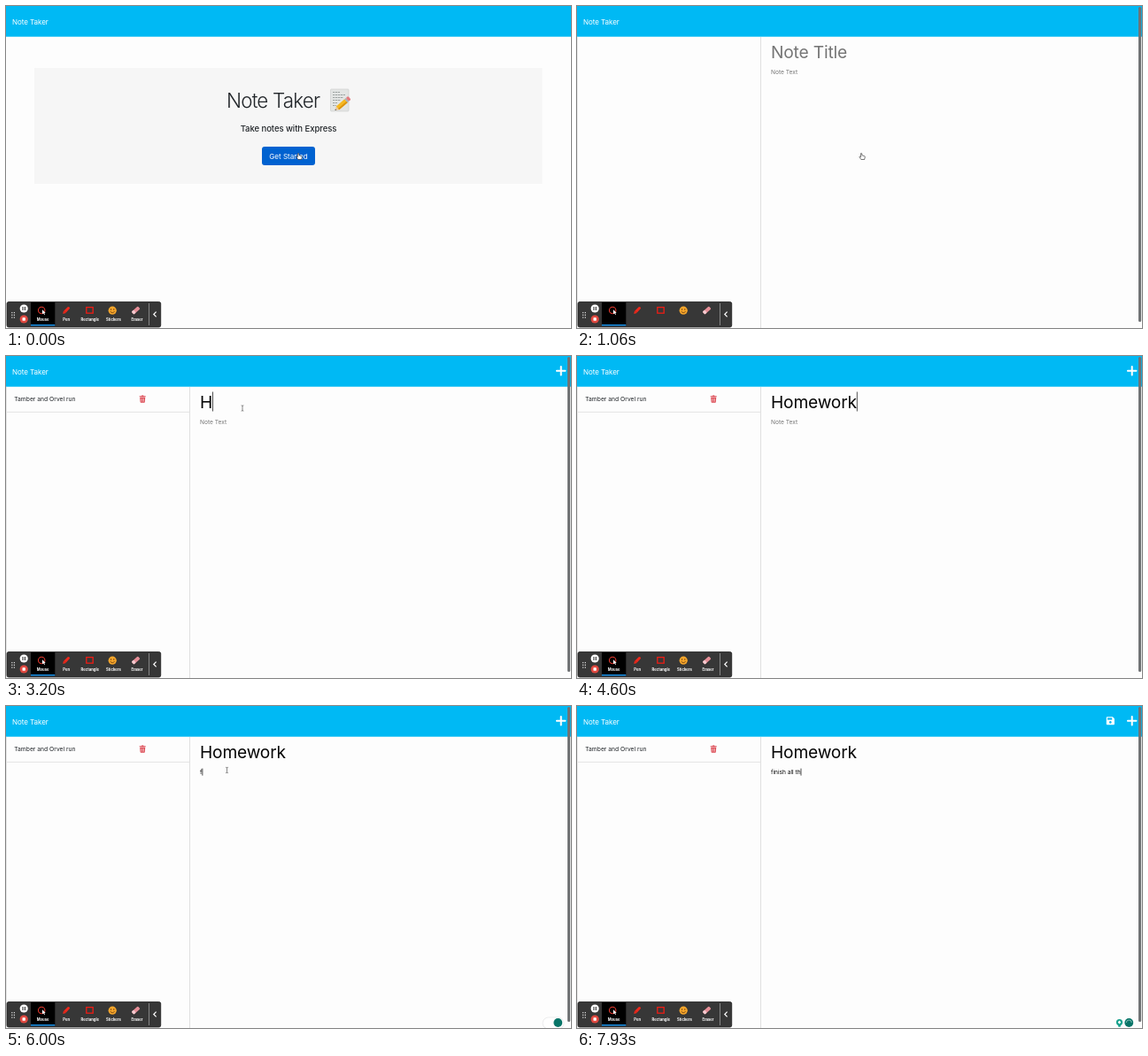
An HTML page that plays this animation: 638 by 364 pixels, repeating every 8000 ms.

```html
<!DOCTYPE html>
<html lang="en">
<head>
<meta charset="utf-8">
<title>Note Taker</title>
<style>
  html, body { margin: 0; width: 100%; height: 100%; overflow: hidden; background: #fdfdfd; }
  svg { display: block; width: 638px; height: 364px; font-family: Inter, "Open Sans", sans-serif; }
  text { white-space: pre; }
  .brand { font-size: 8px; letter-spacing: -.04px; fill: #fff; }
  #title { font-size: 19.2px; letter-spacing: -.18px; }
  #body { font-size: 6.6px; }
  #labels { font-size: 4.2px; font-weight: 700; fill: #fff; text-anchor: middle; }
</style>
</head>
<body>
<svg viewBox="0 0 638 364">
  <rect width="638" height="364" fill="#fdfdfd"/>

  <g id="home">
    <rect x="32" y="70" width="573.5" height="131" fill="#f6f6f6"/>
    <text x="249" y="115.3" font-size="22.4" font-weight="300" letter-spacing="-.8" fill="#212529">Note Taker</text>
    <g id="memo">
      <rect x="366.5" y="94" width="20.5" height="25" rx="1" fill="#e3e5e4" stroke="#c9cccb" stroke-width=".6"/>
      <path d="M369 97.5h8M369 100.5h14M369 103.5h12M369 106.5h9M369 109.5h5M369 112.5h4" stroke="#8d9392" stroke-width=".8" stroke-dasharray="2.4 .6"/>
      <g transform="translate(371.5 118) rotate(-41)">
        <path d="M0 0 4-2.6V2.6Z" fill="#e9c79a"/>
        <path d="M0 0 1.4-.9V.9Z" fill="#444"/>
        <rect x="4" y="-2.6" width="12.5" height="5.2" fill="#f6b821"/>
        <rect x="4" y=".8" width="12.5" height="1.8" fill="#dc9310"/>
        <rect x="16.5" y="-2.6" width="2" height="5.2" fill="#aab0b3"/>
        <rect x="18.5" y="-2.6" width="3.2" height="5.2" rx="1.3" fill="#e5797d"/>
      </g>
    </g>
    <text x="319" y="142" font-size="9.6" font-weight="500" letter-spacing="-.1" text-anchor="middle" fill="#212529">Take notes with Express</text>
    <rect x="289" y="159" width="60" height="21" rx="3" fill="#0062d0"/>
    <text x="319" y="172.5" font-size="8.1" text-anchor="middle" fill="#fff">Get Started</text>
  </g>

  <g id="notes">
    <path d="M207.5 35V364M.3 35V364" stroke="#d8d8d8" stroke-width=".8"/>
    <g class="loaded">
      <path d="M1 63.4H207" stroke="#dedede" stroke-width=".8"/>
      <text x="9.2" y="51.3" font-size="6.75" fill="#212529">Tamber and Orvel run</text>
      <g fill="#dc4650">
        <path d="M150.7 45.2h2.1l.5-.7h1.8l.5.7h2.1v1h-7z"/>
        <path d="M151.2 46.8h6l-.4 5.3q0 .6-.7.6h-3.8q-.7 0-.7-.6z"/>
        <path d="M152.8 47.8v3.9M154.2 47.8v3.9M155.6 47.8v3.9" stroke="#fff" stroke-width=".5"/>
      </g>
    </g>
    <text id="title" x="219" y="59.2"></text>
    <text id="body" x="219" y="77"></text>
    <path id="caret" stroke="#222" stroke-width=".8"/>
  </g>

  <rect width="638" height="34.7" fill="#00b9f4"/>
  <text class="brand" x="7" y="20.5">Note Taker</text>
  <path class="loaded" d="M626.7 12V21.6M621.9 16.8H631.5" stroke="#fff" stroke-width="2" stroke-linecap="round"/>
  <g id="save">
    <path d="M598.7 12.2h6.2l2 2v6.1q0 .9-.9.9h-7.3q-.9 0-.9-.9v-7.2q0-.9.9-.9z" fill="#fff"/>
    <rect x="599" y="13.4" width="5.2" height="2.2" fill="#00b9f4"/>
    <circle cx="602.3" cy="18.4" r="1.3" fill="#00b9f4"/>
  </g>
  <rect id="bar" x="634" y="1" width="3.2" height="356" rx="1.6" fill="#707375"/>

  <g id="helper">
    <rect id="pill" x="606" y="352" width="24" height="13" rx="6.5" fill="#fff" stroke="#e2e4e6" stroke-width=".7"/>
    <g id="tip">
      <circle cx="612.5" cy="357.6" r="3.6" fill="#15a08b"/>
      <rect x="611.1" y="360.8" width="2.8" height="2" rx=".7" fill="#15a08b"/>
      <path d="M612.5 355.6l1.8 2-1.8 2-1.8-2z" fill="#fff"/>
    </g>
    <circle cx="623.3" cy="358" r="4.9" fill="#087568"/>
    <path id="busy" d="M620.3 358a3 3 0 0 1 6 0" fill="none" stroke="#8fc4bc" stroke-width=".9"/>
  </g>

  <g id="toolbar">
    <rect x="1" y="334.5" width="173.7" height="28.5" rx="2" fill="#373737" stroke="#1d1d1d" stroke-width=".8"/>
    <rect x="28" y="335" width="27.3" height="26.5" fill="#000"/>
    <rect x="28" y="360" width="27.3" height="1.5" fill="#1590e8"/>
    <path d="M6.8 346V353M9.4 346V353" stroke="#ddd" stroke-width="1.2" stroke-dasharray="1.2 1.6"/>
    <circle cx="20.2" cy="342" r="4.6" fill="#fff"/>
    <path d="M19 340v4M21.4 340v4" stroke="#333" stroke-width="1.1"/>
    <circle cx="20.2" cy="354" r="4.6" fill="#e0483f"/>
    <rect x="18.5" y="352.3" width="3.4" height="3.4" rx=".4" fill="#fff"/>
    <circle cx="40.2" cy="344" r="3.7" fill="none" stroke="#e8392e" stroke-width="1.1"/>
    <path d="M41 343.2v5l1.3-1 .9 1.8.9-.5-.9-1.6h1.5z" fill="#fff"/>
    <g transform="translate(64.2 348) rotate(-46)" fill="#ee2a1d">
      <path d="M0 0 2.6-1.5H9q1.6 0 1.6 1.5T9 1.5H2.6Z"/>
      <path d="M3.2-1.5V1.5" stroke="#8d1712" stroke-width=".5"/>
    </g>
    <rect x="90.8" y="340.6" width="7.4" height="6.6" fill="none" stroke="#ee1d15" stroke-width="1.3"/>
    <circle cx="120.2" cy="344.2" r="4.6" fill="#f6a62b"/>
    <g fill="#68390d"><circle cx="118.6" cy="343" r=".7"/><circle cx="121.8" cy="343" r=".7"/></g>
    <path d="M117.7 345.5q2.5 2.6 5 0" fill="none" stroke="#68390d" stroke-width=".8"/>
    <g transform="translate(146.6 344) rotate(-42)">
      <rect x="-4.8" y="-2" width="9.6" height="4" rx="1" fill="#e78f98"/>
      <rect x="-4.8" y="-2" width="3.2" height="4" rx="1" fill="#f3cbd0"/>
    </g>
    <path d="M161.5 336V361" stroke="#aaa" stroke-width=".7"/>
    <path d="M169.6 345.6l-2.8 2.9 2.8 2.9" fill="none" stroke="#fff" stroke-width="1.2"/>
    <g id="labels">
      <text x="41.6" y="355.6">Mouse</text>
      <text x="68.2" y="355.6">Pen</text>
      <text x="94.8" y="355.6">Rectangle</text>
      <text x="121.4" y="355.6">Stickers</text>
      <text x="148" y="355.6">Eraser</text>
    </g>
  </g>

  <g id="hand">
    <path d="M-1.5-3.4q.7-.6 1.2.2l.4 2.2 2.4.6q.9.3.7 1.3l-.6 2.6H-1.2L-3 .8q-.3-.9.6-.8l1 .7z" fill="#fff" stroke="#222" stroke-width=".6" stroke-linejoin="round"/>
  </g>
  <path id="beam" d="M-1.3-3.2Q0-3.2 0-2.4Q0-3.2 1.3-3.2M0-2.4V2.4M-1.3 3.2Q0 3.2 0 2.4Q0 3.2 1.3 3.2" fill="none" stroke="#555" stroke-width=".7"/>
</svg>
<script>
const LOOP = 8000, OPEN = 930, LOADED = 1200;
const FOCUS_TITLE = 2200, FOCUS_BODY = 5330;
const titleKeys = [3200, 3530, 3730, 3930, 4130, 4200, 4400, 4600];
const bodyKeys = [6000, 6200, 6400, 6460, 6660, 6800, 7000, 7200, 7330, 7460, 7600, 7800, 7930];
// pointer stops: time, x, y
const stops = [[60, 331, 170], [800, 322, 170], [1460, 322, 170], [2130, 267, 59],
               [4660, 267, 59], [5260, 249.5, 72.5]];

const $ = id => document.getElementById(id);
const show = (el, on) => el.setAttribute("visibility", on ? "visible" : "hidden");
const within = (t, a, b) => t >= a && t < b;
const ease = k => k * k * (3 - 2 * k);

function pointer(t) {
  const n = stops.findIndex(s => s[0] > t);
  if (n === 0) return stops[0].slice(1);
  if (n < 0) return stops.at(-1).slice(1);
  const [t0, x0, y0] = stops[n - 1], [t1, x1, y1] = stops[n];
  const k = ease((t - t0) / (t1 - t0));
  return [x0 + (x1 - x0) * k, y0 + (y1 - y0) * k];
}

function type(el, phrase, keys, hint, t) {
  const count = keys.filter(k => k <= t).length;
  el.textContent = count ? phrase.slice(0, count) : hint;
  el.setAttribute("fill", count ? "#050505" : "#757575");
  return count ? el.getComputedTextLength() : 0;
}

function drawCaret(t, titleWidth, bodyWidth) {
  const inBody = t >= FOCUS_BODY;
  const last = [FOCUS_TITLE, FOCUS_BODY, ...titleKeys, ...bodyKeys].filter(k => k <= t);
  const lit = Math.floor((t - Math.max(...last)) / 500) % 2 === 0;
  const x = 219.4 + (inBody ? bodyWidth : titleWidth);
  $("caret").setAttribute("d", inBody ? `M${x} 70.6V78.6` : `M${x} 40.5V62.5`);
  show($("caret"), t >= FOCUS_TITLE && lit);
}

function draw(t) {
  const open = t >= OPEN, loaded = t >= LOADED;
  $("home").style.display = open ? "none" : "";
  $("notes").style.display = open ? "" : "none";
  document.querySelectorAll(".loaded").forEach(el => show(el, loaded));
  show($("bar"), open);
  show($("labels"), !open || loaded);

  const titleWidth = type($("title"), "Homework", titleKeys, "Note Title", t);
  const bodyWidth = type($("body"), "finish all th", bodyKeys, "Note Text", t);
  if (open) drawCaret(t, titleWidth, bodyWidth);

  show($("save"), t >= 6060);
  $("helper").style.display = t >= 5460 ? "" : "none";
  show($("pill"), t < 6800);
  show($("tip"), t >= 6800);
  show($("busy"), t >= 7800);
  $("busy").setAttribute("transform", `rotate(${(t - 7930) * .36} 623.3 358)`);

  const at = `translate(${pointer(t)})`;
  for (const id of ["hand", "beam"]) $(id).setAttribute("transform", at);
  show($("hand"), t < 1460);
  show($("beam"), within(t, 1460, 3530) || within(t, 4660, 6060));
}

function frame() {
  draw(performance.now() % LOOP);
  requestAnimationFrame(frame);
}
frame();
</script>
</body>
</html>
```
